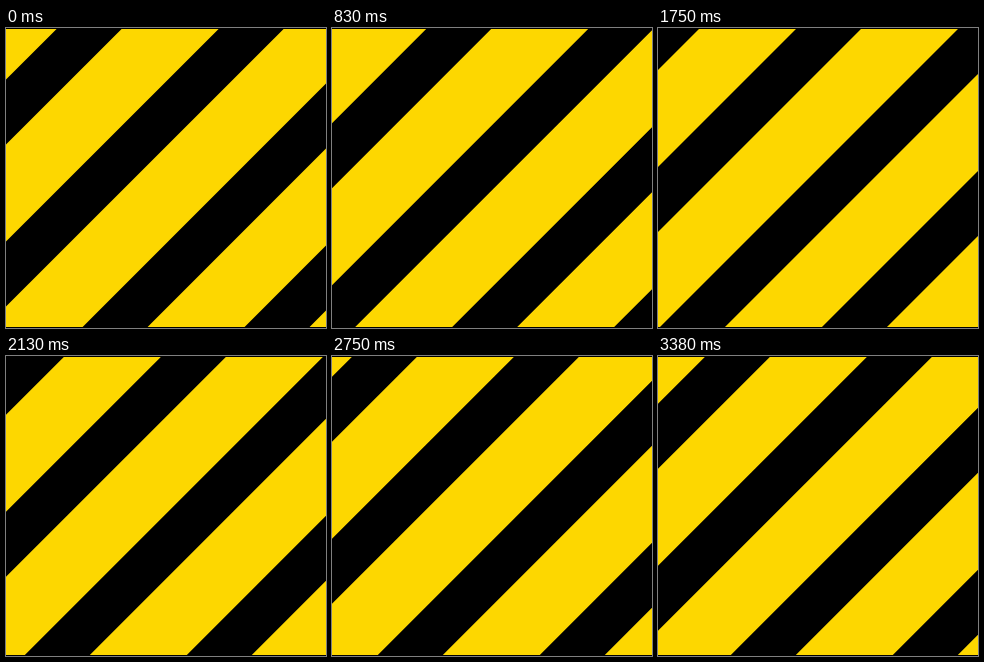
Animation, 320 px wide and 300 px high, one loop 3430 ms. Source, as an HTML page:

```html
<!DOCTYPE html>
<html lang="en">
<head>
<meta charset="utf-8">
<title>Hazard stripes</title>
<style>
  html, body { margin: 0; width: 100%; height: 100%; overflow: hidden; background: #000; }
  svg { display: block; width: 320px; height: 300px; }
</style>
</head>
<body>
<svg viewBox="0 0 320 300">
  <rect y="1" width="320" height="298" fill="#fdd700"/>
  <path id="stripes"/>
  <path d="M0 0h320v1H0zM0 299h320v1H0z"/>
</svg>
<script>
const LOOP = 3430, FPS = 24, LAST = 81;
const PERIOD = 162, BAND = 65, START = 51.6, HEIGHT = 300;
const SPEED = 1.8; // px per step

// [shown step, travelled step]: the stripes run a little faster at first
const PACE = [[0, 0], [12, 15], [20, 24.2], [33, 39.2], [51, 57.9], [66, 72.9], [81, 87.9]];

const stripes = document.getElementById("stripes");
let d = "";
for (let k = -2; k < 5; k++) {
  const x = START + k * PERIOD;
  d += `M${x} 0h${BAND}l${-HEIGHT} ${HEIGHT}h${-BAND}z`;
}
stripes.setAttribute("d", d);

// Steps begin on a 10 ms grid
const stepStart = n => Math.round(n * 100 / FPS) * 10;

function stepAt(ms) {
  let n = Math.min(LAST, Math.floor(ms * FPS / 1000) + 1);
  while (n > 0 && stepStart(n) > ms) n--;
  return n;
}

function travel(n) {
  const i = Math.max(1, PACE.findIndex(p => p[0] >= n));
  const [a, from] = PACE[i - 1], [b, to] = PACE[i];
  return SPEED * (from + (to - from) * (n - a) / (b - a));
}

function draw(ms) {
  const shift = travel(stepAt(ms % LOOP));
  stripes.setAttribute("transform", `translate(${shift.toFixed(2)} 0)`);
}

const begin = performance.now();
function tick() {
  draw(performance.now() - begin);
  requestAnimationFrame(tick);
}
tick();
</script>
</body>
</html>
```
